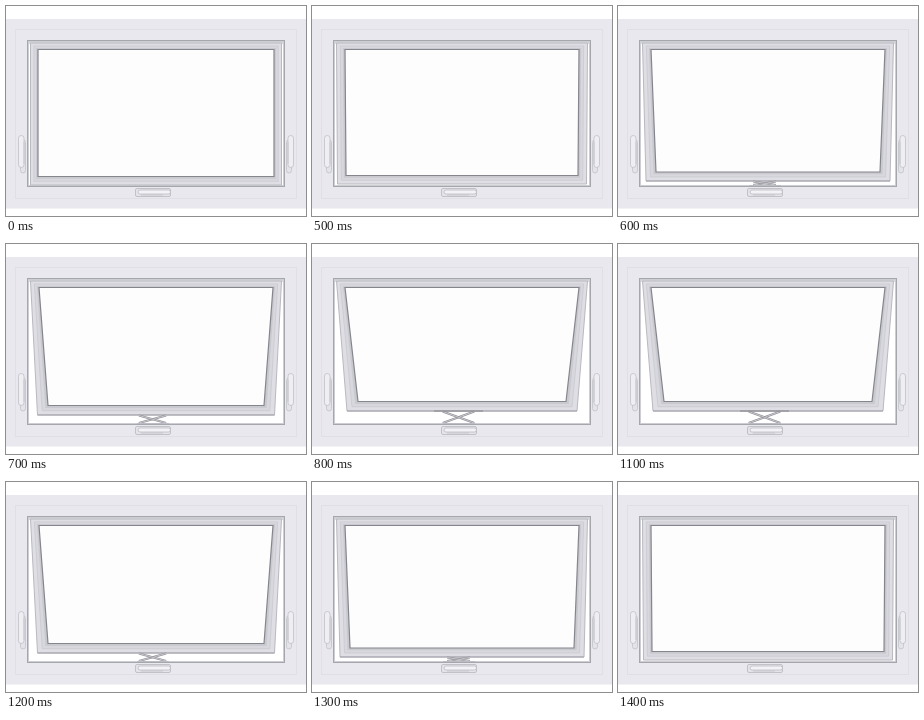
An HTML page with a canvas that plays this animation: 300 px wide and 210 px high, repeating every 1500 ms.

```html
<!DOCTYPE html>
<html lang="en">
<head>
<meta charset="utf-8">
<title>Awning window</title>
<style>
  html, body { margin: 0; width: 100%; height: 100%; overflow: hidden; background: #fff; }
  canvas { display: block; width: 300px; height: 210px; }
</style>
</head>
<body>
<canvas id="stage" width="300" height="210"></canvas>
<script>
const ctx = document.getElementById('stage').getContext('2d');
const LOOP = 1500;

// Sash pose per opening step: outer bottom y, outer left x, glass bottom y, glass left x.
const POSES = [
  [179, 24.5, 170.5, 32],
  [178, 25.5, 169.5, 34],
  [175, 28, 166, 38],
  [171, 31.5, 161.5, 42],
  [167, 35, 157.5, 46],
  [163, 38.5, 154, 49]
];

function poly(points, fill, stroke, width = 1) {
  ctx.beginPath();
  points.forEach(([x, y]) => ctx.lineTo(x, y));
  ctx.closePath();
  if (fill) { ctx.fillStyle = fill; ctx.fill(); }
  if (stroke) { ctx.strokeStyle = stroke; ctx.lineWidth = width; ctx.stroke(); }
}

function line(x1, y1, x2, y2, color, width = 1) {
  ctx.beginPath();
  ctx.moveTo(x1, y1);
  ctx.lineTo(x2, y2);
  ctx.strokeStyle = color;
  ctx.lineWidth = width;
  ctx.stroke();
}

function rect(x, y, w, h, fill) {
  ctx.fillStyle = fill;
  ctx.fillRect(x, y, w, h);
}

function outline(x, y, w, h, color) {
  ctx.strokeStyle = color;
  ctx.lineWidth = 1;
  ctx.strokeRect(x + .5, y + .5, w - 1, h - 1);
}

function pill(x, y, w, h, r, fill, stroke) {
  ctx.beginPath();
  ctx.roundRect(x, y, w, h, r);
  ctx.fillStyle = fill;
  ctx.fill();
  ctx.strokeStyle = stroke;
  ctx.lineWidth = .8;
  ctx.stroke();
}

// Trapezium symmetric about the window's centre line.
function trapezium(topX, topY, bottomX, bottomY) {
  return [[topX, topY], [300 - topX, topY], [300 - bottomX, bottomY], [bottomX, bottomY]];
}

function drawFrame() {
  rect(0, 13, 300, 189.5, '#e8e8ee');
  outline(9, 23, 282, 170, '#dfdfe5');
  rect(21, 34, 258, 147, '#fff');
  outline(21, 34, 258, 147, '#a6a6ad');
  outline(22, 35, 256, 145, '#cdcdd4');
}

function drawSash(step) {
  const [bottom, left, glassBottom, glassLeft] = POSES[step];
  const glassTopX = step ? 33 : 32;
  const mix = (a, b, t) => a + (b - a) * t;
  // Outline of the sash, from its outer edge (0) to the glass (1).
  const ring = t => trapezium(mix(24.5, glassTopX, t), mix(37, 43.5, t),
                              mix(left, glassLeft, t), mix(bottom, glassBottom, t));

  rect(23, 36, 254, 2, '#d6d6dc');
  poly(ring(0), '#dedee4', '#b9b9c0');
  poly(ring(.45), '#d7d7dd', '#cacad1', .8);
  poly(ring(.75), '#c9c9d0');
  poly(ring(1), '#fdfdfd', '#85858d', 1.2);

  if (step > 1) {
    line(left, bottom, 300 - left, bottom, '#a1a1a9', 1.2);
  }
}

function drawScissor(step) {
  if (step < 2) return;
  const top = POSES[step][0];
  const reach = 7 + step * 2.2;
  for (const side of [-1, 1]) {
    const ends = [146.5 - side * reach, top + .5, 146.5 + side * reach, 179];
    line(...ends, '#8d8d94', 2.2);
    line(...ends, '#d7d7dc', .8);
  }
  if (step > 3) {
    line(122, top, 171, top, '#88888f', 1);
  }
  line(131, 179.5, 163, 179.5, '#bcbcc4', 1);
}

function drawSideHandle() {
  pill(14.5, 134, 5, 33, 2.5, '#e3e3e9', '#c2c2c9');
  pill(12.5, 129.5, 5.5, 32, 2.7, '#eeeef3', '#c0c0c7');
  line(18, 136, 18, 158, '#c4c4cb', .8);
}

function drawHandles() {
  drawSideHandle();
  ctx.save();
  ctx.translate(300, 0);
  ctx.scale(-1, 1);
  drawSideHandle();
  ctx.restore();

  pill(129.5, 182.5, 35, 8, 1.5, '#e4e4ea', '#b8b8bf');
  pill(132, 184, 32.5, 4, 2, '#f3f3f7', '#bababf');
  line(135, 189, 157, 189, '#c2c2c9', .9);
}

// Opens over five steps, rests, then closes back to the first step.
function stepAt(ms) {
  if (ms < 500) return 0;
  const tick = Math.floor(ms / 100) - 4;
  return tick <= 5 ? tick : Math.min(5, 11 - tick);
}

let shown = -1;
function tick(now) {
  const step = stepAt(now % LOOP);
  if (step !== shown) {
    shown = step;
    rect(0, 0, 300, 210, '#fff');
    drawFrame();
    drawSash(step);
    drawScissor(step);
    drawHandles();
  }
  requestAnimationFrame(tick);
}
tick(performance.now());
</script>
</body>
</html>
```
